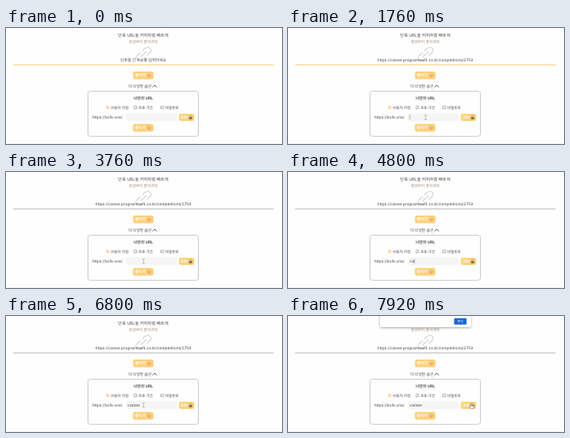
These frames come from a looping animation (345x146 px, 8000 ms). An HTML page:

```html
<!DOCTYPE html>
<html lang="ko">
<head>
<meta charset="utf-8">
<style>
  html, body { margin: 0; width: 100%; height: 100%; overflow: hidden; background: #fefefe; }
  svg { display: block; width: 345px; height: 146px; }
  text { font: 4.8px Inter, "Noto Sans CJK KR", sans-serif; fill: #444; text-rendering: geometricPrecision; }
  .ko { font-family: "Noto Sans CJK KR", "Noto Sans CJK", sans-serif; }
  .mid { text-anchor: middle; }
  .bold { font-weight: 700; }
  .label { font-size: 4.6px; }
  .white { fill: #fff; }
  .button { fill: #fdd07a; }
  .line { fill: none; stroke-linecap: round; stroke-linejoin: round; }
</style>
</head>
<body>
<svg viewBox="0 0 345 146">
  <defs>
    <g id="shorten">
      <rect class="button" x="-12.8" y="-4.8" width="25.6" height="9.6" rx="2"/>
      <text class="ko bold white" x="-10.3" y="1.8">줄이기</text>
      <path d="M5.2 -1.2h4v1.8a2 1.9 0 0 1-4 0z" fill="#eeaa7c"/>
      <path class="line" d="M9.4 -.7q1.4 .1 1 1.2q-.4 .7-1.3 .7M6.3 -3v.8M8.1 -3v.8" stroke="#eeaa7c" stroke-width=".5"/>
    </g>
    <filter id="shadow" x="-20%" y="-50%" width="140%" height="220%">
      <feDropShadow dx="0" dy=".8" stdDeviation="1.4" flood-opacity=".4"/>
    </filter>
  </defs>

  <path d="M0 145.5H345" stroke="#ececec" stroke-width=".8"/>
  <text class="ko mid" x="171.4" y="11" font-weight="500" style="font-size:5.25px">단축 URL을 커피처럼 빠르게</text>
  <text class="ko mid" x="171.5" y="18.8" style="font-size:4.75px;fill:#9c8076">생성부터 분석까지</text>

  <g class="line" transform="translate(172 32.9) rotate(-42) scale(1.1)" stroke="#dcdcdc" stroke-width="1.4">
    <path d="M-2 -3.7H-6.3a3.7 3.7 0 0 0 0 7.4H-2M2 -3.7H6.3a3.7 3.7 0 0 1 0 7.4H2M-4.3 0H4.3"/>
  </g>

  <text class="ko mid" id="hint" x="171.6" y="42.1">단축할 긴 주소를 입력하세요</text>
  <text class="mid" id="address" x="171.5" y="42.1">https://career.programmers.co.kr/competitions/2759</text>
  <path d="M9 46.5H334.5" stroke="#bdbdbd"/>
  <g id="focus">
    <path d="M9 46.5H334.5" stroke="#fefefe"/>
    <path d="M9 46.4H334.5" stroke="#fdd592" stroke-width="1.2"/>
  </g>

  <use href="#shorten" x="171.6" y="59.6"/>
  <text class="ko" x="152.9" y="74.8" font-weight="500" style="font-size:4.75px">더 다양한 옵션</text>
  <path class="line" d="M183.6 74.3l2.3-2.4l2.3 2.4" stroke="#444" stroke-width=".9"/>

  <rect x="102.5" y="79.5" width="138" height="56.8" rx="3" fill="#fefefe" stroke="#bbb" stroke-width=".8"/>
  <text class="ko mid bold" x="171.7" y="90">나만의 URL</text>

  <rect x="125.2" y="98.2" width="3.6" height="3.6" rx=".6" fill="#fbcd7c"/>
  <path class="line" d="M126 100l.8 .8l1.4-1.6" stroke="#fff" stroke-width=".6"/>
  <g fill="none" stroke="#777" stroke-width=".6">
    <rect x="160" y="98.3" width="3.4" height="3.4" rx=".5"/>
    <rect x="193.5" y="98.3" width="3.4" height="3.4" rx=".5"/>
  </g>
  <text class="ko label" x="130.8" y="101.8">사용자 지정</text>
  <text class="ko label" x="165.6" y="101.8">유효 기간</text>
  <text class="ko label" x="199" y="101.8">비밀번호</text>

  <text x="107.8" y="114">https://kofe.one/</text>
  <rect x="150" y="107.3" width="63.5" height="10" rx="1.2" fill="#f5f5f5"/>
  <text id="typed" x="152.1" y="114" style="font-size:5.1px"></text>

  <rect class="button" x="216.2" y="107.9" width="19" height="9.2" rx="2"/>
  <text class="ko bold white" x="218.2" y="114.2" style="font-size:4.7px">조회</text>
  <path class="line" d="M229.5 112.3v-1a1.2 1.2 0 0 1 2.4 0v1" stroke="#a58a62" stroke-width=".6"/>
  <rect x="228.8" y="112.1" width="3.8" height="2.8" rx=".5" fill="#8a6f4a"/>
  <use href="#shorten" x="171.4" y="125.6"/>

  <path id="caret" d="M0 -3V3" stroke="#555" stroke-width=".45"/>
  <path id="beam" class="line" d="M-1 -3Q0 -3 0 -2.2Q0 -3 1 -3M0 -2.2V2.2M-1 3Q0 3 0 2.2Q0 3 1 3" stroke="#888" stroke-width=".55"/>
  <path id="hand" d="M-.8 -2.8q.7-.7 1.2 0v2.2l2 .5q.7 .3 .5 1.2l-.6 2.2h-3.1l-1.9-2.6q0-1 1.1-.5l.8 .6z" fill="#fff" stroke="#555" stroke-width=".5"/>

  <g id="dialog">
    <rect x="115" y="-10" width="113.5" height="24" rx="2.5" fill="#fff" filter="url(#shadow)"/>
    <rect x="207.6" y="2.8" width="15.6" height="8" rx="1.2" fill="#1966d2"/>
    <text class="ko mid white" x="215.4" y="8.3" style="font-size:4px">확인</text>
  </g>
</svg>
<script>
const LOOP = 8000, BLINK = 560;
const PASTE = 560, BLUR = 1760, DIALOG = 7760;
const WORD = "career";
const keyTimes = [4160, 4640, 5120, 5760, 5920, 6080];
// time, x, y
const mousePath = [
  [640, 182, 60], [960, 177, 112], [1440, 177, 112], [1720, 172, 112.5],
  [6800, 172, 112], [7320, 230, 114], [7600, 230, 114], [7800, 229.3, 113.4]
];
const el = id => document.getElementById(id);
const show = (id, on) => el(id).style.display = on ? "" : "none";
const move = (id, x, y) => el(id).setAttribute("transform", `translate(${x} ${y})`);
const clamp = v => Math.max(0, Math.min(1, v));
const smooth = v => v * v * (3 - 2 * v);

function mouseAt(t) {
  let [, x, y] = mousePath[0];
  for (let i = 1; i < mousePath.length; i++) {
    const [t0, x0, y0] = mousePath[i - 1], [t1, x1, y1] = mousePath[i];
    const k = smooth(clamp((t - t0) / (t1 - t0)));
    if (t >= t0) { x = x0 + (x1 - x0) * k; y = y0 + (y1 - y0) * k; }
  }
  return [x, y];
}

function draw(t) {
  show("hint", t < PASTE);
  show("address", t >= PASTE);
  el("focus").style.opacity = 1 - clamp((t - BLUR) / 200);

  const typed = keyTimes.filter(k => t >= k).length;
  el("typed").textContent = WORD.slice(0, typed);

  // The caret stays on after each key press, then blinks.
  const lastEdit = typed ? keyTimes[typed - 1] : BLUR;
  show("caret", t >= BLUR && Math.floor((t - lastEdit) / BLINK) % 2 === 0);
  move("caret", 152.2 + (typed && el("typed").getComputedTextLength()), 112.3);

  const [x, y] = mouseAt(t);
  const visible = t >= 640 && (t < keyTimes[0] || t >= 6800);
  const onButton = x > 216;
  show("beam", visible && !onButton);
  show("hand", visible && onButton);
  move("beam", x, y);
  move("hand", x, y);

  show("dialog", t >= DIALOG);
  el("dialog").style.opacity = clamp((t - DIALOG + 80) / 160);
}

function tick() {
  draw(performance.now() % LOOP);
  requestAnimationFrame(tick);
}
tick();
</script>
</body>
</html>
```
